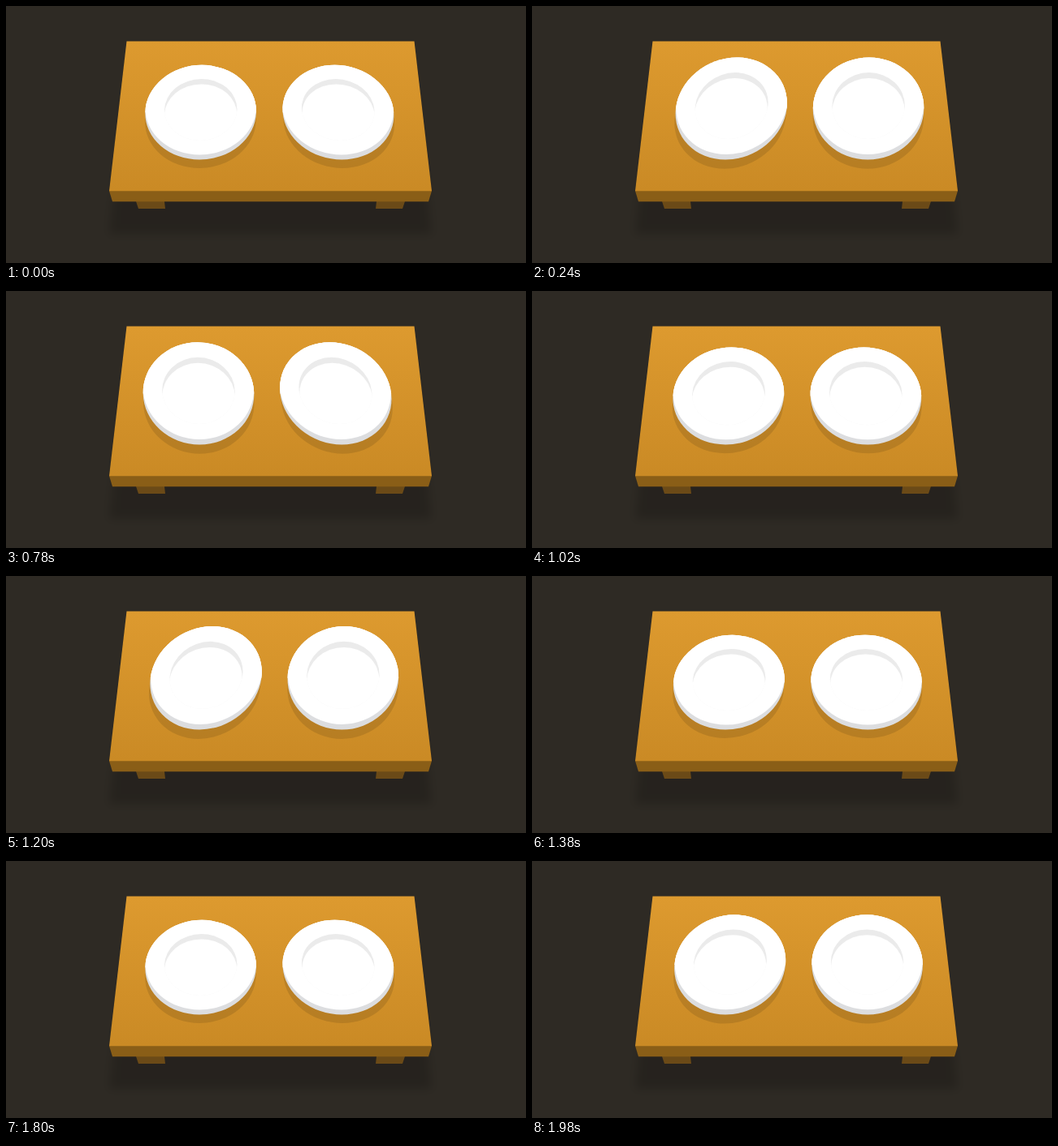
These frames come from a looping animation (640 by 317 pixels, 2040 ms). An HTML page:

```html
<!DOCTYPE html>
<html lang="en">
<head>
<meta charset="utf-8">
<title>Wobbling bowls</title>
<style>
  html, body { margin: 0; width: 100%; height: 100%; overflow: hidden; background: #2e2a24; }
  svg { display: block; width: 640px; height: 317px; }
</style>
</head>
<body>
<svg viewBox="0 0 640 317">
  <defs>
    <linearGradient id="wood" x1="0" y1="0" x2="0" y2="1">
      <stop offset="0" stop-color="#dd9a2f"/>
      <stop offset="1" stop-color="#ca8a25"/>
    </linearGradient>
    <filter id="blur" x="-10%" y="-10%" width="120%" height="120%">
      <feGaussianBlur stdDeviation="6"/>
    </filter>
    <clipPath id="rim"><ellipse cy="-58.5" rx="68.3" ry="58.5"/></clipPath>
    <clipPath id="well"><ellipse cy="-61.7" rx="44.7" ry="38.1"/></clipPath>
    <!-- Bowl resting on its bottom point at the local origin -->
    <g id="bowl">
      <ellipse cy="-48" rx="68.3" ry="58.5" fill="#000" fill-opacity=".11"/>
      <g clip-path="url(#rim)">
        <rect x="-70" y="-120" width="140" height="122" fill="#dcdddf"/>
        <ellipse cy="-64.5" rx="68.3" ry="58.5" fill="#fff"/>
        <rect x="-70" y="-120" width="140" height="61.5" fill="#fff"/>
      </g>
      <g clip-path="url(#well)">
        <rect x="-46" y="-102" width="92" height="80" fill="#ebebeb"/>
        <ellipse cy="-55.2" rx="44.7" ry="38.1" fill="#fff"/>
        <rect x="-46" y="-58.5" width="92" height="40" fill="#fff"/>
      </g>
    </g>
  </defs>
  <rect width="640" height="317" fill="#2e2a24"/>
  <path d="M148 97H503L524 281H127Z" fill="#000" fill-opacity=".18" filter="url(#blur)"/>
  <path d="M160 241H195L196 250H163ZM491 241H456L455 250H488Z" fill="#6b4a17"/>
  <path d="M127 228H524L520 241.3H131Z" fill="#8a5e17"/>
  <path d="M148.5 43.5H502.5L524 228.3H127Z" fill="url(#wood)"/>
  <use id="left" href="#bowl"/>
  <use id="right" href="#bowl"/>
</svg>
<script>
  const LOOP = 2040, STEP = 60;
  const SWING = 450;   // one tilt from side to side
  const SQUASH = 160;  // time from the tallest pose to the flattest
  const TALL = { lean: 4.7, height: 127.4 };
  const FLAT = { lean: 1.4, height: 116.4 };
  const left = document.getElementById('left');
  const right = document.getElementById('right');

  const mix = (a, b, p) => a + (b - a) * p;
  const ease = x => 0.375 * (1 - Math.cos(Math.PI * x)) + 0.25 * x;

  function pose(t) {
    const since = t + 2 * SWING - 300;
    const side = Math.floor(since / SWING) % 2 ? -1 : 1;
    const u = since % SWING;
    const sinking = u < SQUASH;
    const p = ease(sinking ? u / SQUASH : (u - SQUASH) / (SWING - SQUASH));
    const lean = sinking ? mix(TALL.lean, FLAT.lean, p) : mix(FLAT.lean, -TALL.lean, p);
    const height = sinking ? mix(TALL.height, FLAT.height, p) : mix(FLAT.height, TALL.height, p);
    return { lean: side * lean, height };
  }

  function place(bowl, x, tilt, { lean, height }) {
    const scale = height / 117;
    const skew = tilt + lean / (height / 2);
    bowl.setAttribute('transform', `matrix(1 0 ${-skew * scale} ${scale} ${x} 189.5)`);
  }

  function draw() {
    const t = performance.now() % LOOP;
    const now = pose(Math.floor(t / STEP) * STEP);
    place(left, 238.2, 0.05, now);
    place(right, 413.3, -0.05, now);
    requestAnimationFrame(draw);
  }
  draw();
</script>
</body>
</html>
```
